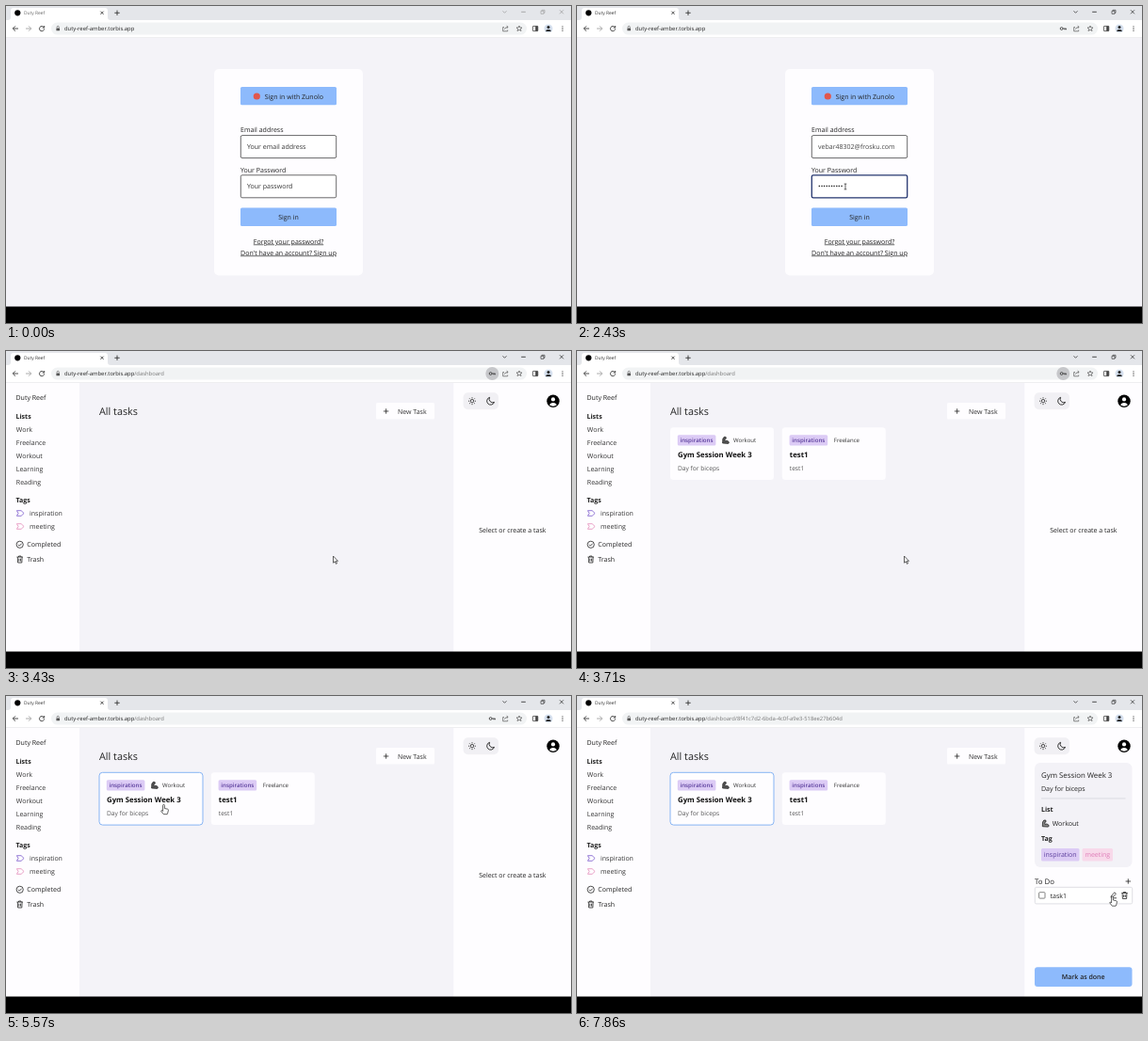
Write an HTML page that moves like this. It is 600 px wide and 337 px high and loops after 8000 ms.

```html
<!DOCTYPE html>
<html lang="en">
<head>
<meta charset="utf-8">
<title>Duty Reef</title>
<style>
html, body { margin: 0; width: 100%; height: 100%; overflow: hidden; background: #000; }
svg { display: block; width: 100vw; height: 100vh; }
text { font-family: "Open Sans", "Noto Sans", sans-serif; text-rendering: geometricPrecision; white-space: pre; }
</style>
</head>
<body>
<svg id="stage" viewBox="0 0 600 337"></svg>
<script>
const LOOP = 8000, STEPS = 56;
const INK = '#222', PAGE = '#f4f3f8', BLUE = '#8dbafc', LILAC = '#dccbf5', VIOLET = '#5a3d9c';

// y is the middle of the capital letters
const text = (x, y, str, { size = 7.03, fill = INK, weight = 400, more = '' } = {}) =>
  `<text x="${x}" y="${y + size * .357}" font-size="${size}" fill="${fill}" font-weight="${weight}" ${more}>${str}</text>`;
const mid = (x, y, str, o = {}) => text(x, y, str, { ...o, more: 'text-anchor="middle" ' + (o.more || '') });
const box = (x, y, w, h, fill, r = 0, stroke = 'none', sw = .7) =>
  `<rect x="${x}" y="${y}" width="${w}" height="${h}" rx="${r}" fill="${fill}" stroke="${stroke}" stroke-width="${sw}"/>`;
const disc = (x, y, r, fill, stroke = 'none') =>
  `<circle cx="${x}" cy="${y}" r="${r}" fill="${fill}" stroke="${stroke}" stroke-width=".8"/>`;
const icon = (x, y, d, { stroke = INK, fill = 'none', sw = .8 } = {}) =>
  `<path transform="translate(${x} ${y})" d="${d}" fill="${fill}" stroke="${stroke}" stroke-width="${sw}" stroke-linejoin="round"/>`;

const SHAPES = {
  plus: 'M-2.7 0h5.4M0-2.7v5.4',
  cross: 'M-2-2l4 4M2-2l-4 4',
  trash: 'M-3.2-2.5h6.4M-1.2-2.5v-1h2.4v1M-2.4-2.5l.3 6h4.2l.3-6M-.8-.8v2.8M.8-.8v2.8',
  pencil: 'M-2.8 2.4l.5-2 3.4-3.4 1.5 1.5-3.4 3.4zM.2 3h3',
  tag: 'M-3.6-2.8h4.7l3 2.8-3 2.8h-4.7l1.7-2.8z',
  arm: 'M-3.2 3.2l.2-4.6 1.3-2h2l.2 1.8-1.3.4.2 2.2q2.2-1.2 3.7.4 1.2 1.2-.2 2.2z',
  arrow: 'M0 0v7.2l1.7-1.5 1.2 2.6 1.1-.5-1.2-2.5h2.2z',
  hand: 'M-.9.8a.9.9 0 0 1 1.8 0v3.2l3.2.7q1 .3.8 1.3l-.6 2.6-.6 1.6h-3.9l-2.6-3.4q.2-1.2 1.5-.4l.4.5z',
  beam: 'M-1.3-2.9h2.6M0-2.9v5.8M-1.3 2.9h2.6'
};

// step, x, y of the pointer tip
const PATH = [
  [2, 430, 200], [5, 300, 152], [7, 300, 152], [9, 269, 157], [11, 269, 157],
  [14, 285, 192], [17, 285, 192], [21, 347.5, 218], [27, 347.5, 218],
  [39, 167.5, 115.5], [43, 161.5, 112.5], [49, 161.5, 112.5], [55, 568.5, 213]
];

function pointerAt(k) {
  const i = Math.max(1, PATH.findIndex(p => p[0] >= k));
  const [k0, x0, y0] = PATH[i - 1], [k1, x1, y1] = PATH[i];
  const u = (k - k0) / (k1 - k0), e = u * u * (3 - 2 * u);
  return [x0 + (x1 - x0) * e, y0 + (y1 - y0) * e];
}

const inside = ([x, y], l, t, r, b) => x >= l && x <= r && y >= t && y <= b;
const overCard = (p, l) => inside(p, l, 81, l + 110, 137);

function browser(k) {
  const ctl = k < 1 ? '#999' : '#222', grey = { stroke: '#555' };
  let path = '';
  if (k >= 24) path = '/dashboard';
  if (k >= 46) path += '/8f41c7d2-6bda-4c0f-a9e3-518ee27b604d';
  let s = box(0, 0, 600, 16, '#e4e6ea') + box(0, 15, 600, 19, '#fff')
    + icon(0, 0, 'M2 15q3 0 3-3V5q0-3 3-3h97q3 0 3 3v7q0 3 3 3z', { fill: '#fff', stroke: 'none' })
    + disc(12.3, 7.3, 3.1, '#000')
    + text(19, 7.4, 'Duty Reef', { size: 4.9, fill: k < 1 ? '#666' : '#333' })
    + icon(102, 7.3, 'M-1.6-1.6l3.2 3.2M1.6-1.6l-3.2 3.2') + icon(118, 7.3, SHAPES.plus)
    + icon(529.5, 6.3, 'M-2-1l2 2 2-2', { stroke: ctl, sw: .7 })
    + icon(549.5, 6.3, 'M-2.3 0h4.6', { stroke: ctl })
    + icon(570, 6.3, 'M-2-1h3v3h-3zM-1-1v-1h3v3h-1', { stroke: ctl, sw: .6 })
    + icon(590, 6.3, SHAPES.cross, { stroke: ctl, sw: .7 });
  s += icon(10, 24, 'M3 0h-5.6M0-2.7l-2.7 2.7 2.7 2.7')
    + icon(24, 24, 'M-3 0h5.6M0-2.7l2.7 2.7-2.7 2.7', { stroke: '#999' })
    + icon(38, 24, 'M2.2-1.3a2.6 2.6 0 1 0 .4 1.6M2.7-3v2h-2')
    + box(48, 17.6, 505, 13, '#f1f3f4', 6.5)
    + box(53.4, 23.4, 3.6, 2.9, '#555', .4) + icon(55.2, 23.4, 'M-1.1 0v-1a1.1 1.1 0 0 1 2.2 0v1', { ...grey, sw: .6 })
    + text(62, 24, `duty-reef-amber.torbis.app<tspan fill="#777">${path}</tspan>`, { size: 5.86 })
    + icon(530.5, 24, 'M-1.5-1.5h-1.3v4.3h5v-1.3M-1 .8q.3-2.4 3.3-2.4M1.2-3l1.5 1.4-1.5 1.4', { ...grey, sw: .7 })
    + icon(545, 24, 'M0-3l.9 2h2.1l-1.6 1.4.6 2.1-2-1.2-2 1.2.6-2.1-1.6-1.4h2.1z', { ...grey, sw: .7 })
    + box(559.4, 21.4, 5.4, 5.2, 'none', .5, '#444', .8) + box(562.2, 21.4, 2.6, 5.2, '#444')
    + disc(576, 24, 4.5, '#d5e0ee') + disc(576, 22.6, 1.5, '#222') + icon(576, 27, 'M-2.8 0q0-2 2.8-2t2.8 2z', { fill: INK, stroke: 'none' })
    + [-2.2, 0, 2.2].map(d => disc(591, 24 + d, .65, '#444')).join('');
  if (k >= 14 && k < 46) {
    if (k >= 21 && k < 32) s += disc(516.3, 24, 7, '#c6c7ca');
    s += disc(514.6, 24, 1.4, 'none', '#333') + icon(516, 24, 'M0 0h3.6M2 0v1.3M3.3 0v1.3', { stroke: '#333' });
  }
  return s + box(0, 33.4, 600, .6, '#e3e3e7');
}

function field(y, label, content, focused) {
  return text(249, y - 5.5, label)
    + box(249.3, y + .3, 101.4, 24, '#fff', 1.6, focused ? '#25366f' : '#444', focused ? 1.3 : .8) + content(y + 12.3);
}

function login(k) {
  const filled = k >= 6 && k < 21, picked = k >= 9 && k < 12;
  const email = y => !filled ? text(256, y, 'Your email address', { fill: '#333' })
    : (picked ? box(256, y - 5.3, 39, 10.8, '#3064c2') : '')
      + text(256, y, `<tspan fill="${picked ? '#fff' : '#444'}">vebar48302</tspan>@frosku.com`, { fill: '#444' });
  const secret = y => k >= 15 && k < 21 ? text(256, y, '••••••••••') : text(256, y, 'Your password', { fill: '#333' });
  const line = { more: 'text-decoration="underline"' };
  return box(0, 34, 600, 286, PAGE) + box(221, 67, 158, 219.5, '#fefdff', 5)
    + box(249, 86, 102, 19.3, BLUE, 1.6) + disc(266.3, 96, 3.6, '#e2574c') + text(274.7, 96, 'Sign in with Zunolo')
    + field(137.3, 'Email address', email, k >= 5 && k < 14)
    + field(179.5, 'Your Password', secret, k >= 14 && k < 21)
    + box(249, 214.5, 102, 19.5, BLUE, 1.6) + mid(300, 224.3, 'Sign in')
    + mid(300, 250, 'Forgot your password?', line) + mid(300, 262, 'Don\'t have an account? Sign up', line);
}

function card(x, title, note, list, arm, lit) {
  return box(x, 81.3, 110, 55.8, '#fefdff', 3.5, lit ? '#86b4f4' : 'none', 1)
    + box(x + 7.8, 89.2, 40.6, 11.2, LILAC, 1.5)
    + mid(x + 28, 94.8, 'inspirations', { size: 6.15, fill: VIOLET, weight: 600 })
    + (arm ? icon(x + 58.8, 94.8, SHAPES.arm, { fill: '#555', sw: .7 }) : '')
    + text(x + (arm ? 67 : 55), 94.8, list, { size: 6.05, fill: '#333' })
    + text(x + 8, 110, title, { size: 7.8, weight: 700, fill: '#111' })
    + text(x + 8, 124.7, note, { size: 6.65, fill: '#555' });
}

function details() {
  return box(486, 71, 103.5, 111, '#f3f2f7', 6)
    + text(493, 84, 'Gym Session Week 3', { size: 7.85 }) + text(493, 98, 'Day for biceps')
    + box(493, 108.6, 89.5, .7, '#d0d0d6')
    + text(493, 120, 'List', { weight: 700 }) + icon(497.5, 135.5, SHAPES.arm, { fill: '#888' }) + text(504.7, 135.6, 'Workout')
    + text(493, 151.6, 'Tag', { weight: 700 })
    + box(493, 162, 40.5, 13.5, LILAC, 1.5) + mid(513.2, 168.7, 'inspiration', { fill: VIOLET, weight: 500 })
    + box(536.5, 162, 32.5, 13.5, '#f8d9ea', 1.5) + mid(552.8, 168.7, 'meeting', { fill: '#df7db8', weight: 500 })
    + text(486, 197, 'To Do', { size: 7.8 }) + icon(585.3, 197, SHAPES.plus)
    + box(486.3, 203.3, 103.4, 17.6, '#fff', 1.5, '#d2d2d8')
    + box(490.6, 208.7, 6.4, 6.4, '#fff', .8, '#666', .8) + text(502.5, 212, 'task1')
    + icon(569.8, 211.8, SHAPES.pencil) + icon(581.5, 212, SHAPES.trash)
    + box(486, 288.3, 103.5, 20.7, BLUE, 3) + mid(537.7, 298.6, 'Mark as done', { weight: 600 });
}

function dashboard(k, p) {
  const dim = { fill: '#333' }, bold = { weight: 700 };
  const rays = [...Array(8)].map((_, i) => {
    const c = Math.cos(i * Math.PI / 4), s = Math.sin(i * Math.PI / 4);
    return `M${2.8 * c} ${2.8 * s}L${4 * c} ${4 * s}`;
  }).join('');
  let s = box(0, 34, 600, 286, PAGE) + box(0, 34, 78, 286, '#fefdff') + box(475.3, 34, 125, 286, '#fefdff')
    + text(10.5, 49.5, 'Duty Reef') + text(10.5, 69, 'Lists', bold)
    + ['Work', 'Freelance', 'Workout', 'Learning', 'Reading'].map((w, i) => text(10.8, 83 + 14 * i, w, dim)).join('')
    + text(10.5, 158.5, 'Tags', bold)
    + icon(15, 172.5, SHAPES.tag, { stroke: '#7a58cc' }) + text(25, 172.5, 'inspiration', dim)
    + icon(15, 186.5, SHAPES.tag, { stroke: '#e58cba' }) + text(25, 186.5, 'meeting', dim)
    + disc(14.7, 205.8, 3.6, 'none', INK) + icon(14.7, 205.8, 'M-1.7 0l1.3 1.4 2.3-2.5') + text(22.3, 205.8, 'Completed')
    + icon(14.7, 221.5, SHAPES.trash) + text(22.3, 221.5, 'Trash')
    + text(99, 63.8, 'All tasks', { size: 10.8 })
    + box(393, 55, 62, 17.6, '#fefdff', 1.5) + icon(403.6, 64, SHAPES.plus) + text(416, 64, 'New Task', dim)
    + box(485.6, 44.3, 37.4, 18, '#f1f0f4', 5)
    + disc(495, 53.2, 1.7, 'none', INK) + icon(495, 53.2, rays)
    + icon(514.5, 53.2, 'M-.9-3.9a4 4 0 1 0 4.9 5.1a3.7 3.7 0 0 1-4.9-5.1z', { sw: .9 })
    + disc(581, 53.2, 6.7, '#000') + disc(581, 51.4, 2.1, '#fff')
    + icon(581, 57.6, 'M-3.8 0q.5-2.7 3.8-2.7t3.8 2.7q-3.8 2.3-7.6 0z', { fill: '#fff', stroke: 'none' });
  if (k >= 25) {
    s += card(99, 'Gym Session Week 3', 'Day for biceps', 'Workout', true, k >= 40 || overCard(p, 99))
      + card(217.8, 'test1', 'test1', 'Freelance', false, overCard(p, 217.8));
  }
  return s + (k >= 46 ? details() : mid(537.8, 190, 'Select or create a task'));
}

function pointer(k, p) {
  if (k < 2) return '';
  let kind = 'arrow';
  if (k < 24) {
    if (inside(p, 249, 137, 351, 162) || inside(p, 249, 179, 351, 204)) kind = 'beam';
    if (inside(p, 249, 214, 351, 234)) kind = 'hand';
  } else if (overCard(p, 99) || overCard(p, 218) || inside(p, 566, 208, 585, 216)) kind = 'hand';
  return icon(...p, SHAPES[kind], { fill: kind === 'beam' ? 'none' : '#fff', sw: .7 });
}

const stage = document.getElementById('stage');
let shown = -1;
function tick(now) {
  // small offset keeps rounded step times on the right side
  const k = Math.floor((now % LOOP + 5) * STEPS / LOOP) % STEPS;
  if (k !== shown) {
    shown = k;
    const p = pointerAt(k);
    stage.innerHTML = browser(k) + (k < 24 ? login(k) : dashboard(k, p))
      + box(0, 319.5, 600, 18, '#000') + pointer(k, p);
  }
  requestAnimationFrame(tick);
}
tick(0);
</script>
</body>
</html>
```
